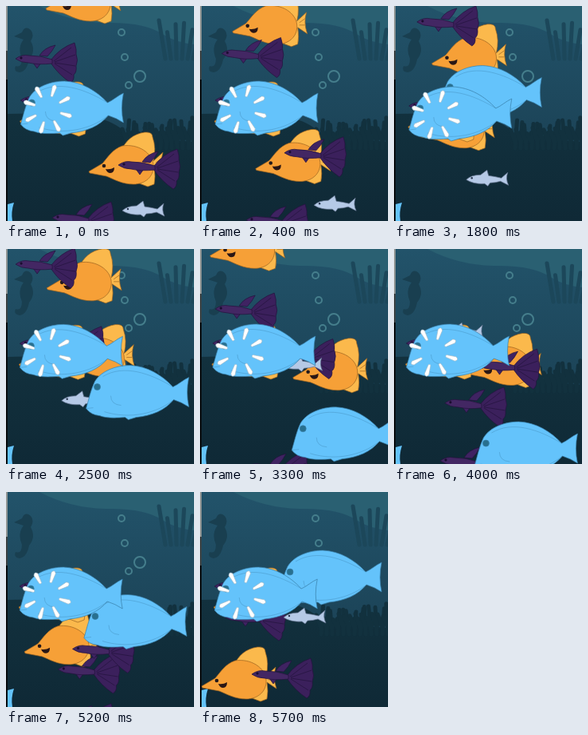
An HTML page that plays this animation: 236x269 px, repeating every 5.8 s.

```html
<!DOCTYPE html>
<html lang="en">
<head>
<meta charset="utf-8">
<title>Reef</title>
<style>
  html, body { margin: 0; width: 100%; height: 100%; overflow: hidden; background: #12303d; }
  svg { display: block; width: 100vw; height: 100vh; }
</style>
</head>
<body>
<svg viewBox="0 0 236 269" preserveAspectRatio="none">
  <defs>
    <linearGradient id="water" x2="0" y2="1">
      <stop offset="0" stop-color="#22536a"/>
      <stop offset=".6" stop-color="#1c4458"/>
    </linearGradient>
    <linearGradient id="floor" x2="0" y2="1">
      <stop offset="0" stop-color="#12313e"/>
      <stop offset="1" stop-color="#0f2936"/>
    </linearGradient>

    <!-- origin: top left of the body -->
    <g id="blue" stroke="#397fa8" stroke-width=".7" stroke-linejoin="round">
      <path fill="#64c3fb" d="M1 54C4 44 7 30 12 20C20 7 38 0 56 0C78 1 96 12 110 27C117 24 123 18 130 15Q126 34 130 52Q121 46 111 43C100 56 84 63 64 65L54 68L50 65C36 66 26 66 18 63Q7 62 1 54Z"/>
      <path fill="none" stroke-opacity=".5" d="M22 14C48 -2 82 10 110 27M24 58C56 68 90 60 111 43M32 38Q32 49 45 50M1 54L10 53"/>
      <circle cx="15" cy="27" r="4" fill="#28708f"/>
    </g>

    <!-- origin: tip of the snout -->
    <g id="orange" stroke="#9b6420" stroke-width=".7" stroke-linejoin="round">
      <path fill="#fbb94c" d="M40 -26C46 -40 56 -48 70 -50Q80 -51 80 -44Q85 -30 81 -14L93 -25Q89 -12 94 2L82 -6Q84 6 82 15L74 18L58 12Z"/>
      <path fill="#f6a037" d="M0 -1L17 -11C24 -19 30 -29 42 -33C62 -36 80 -24 81 -9C82 6 70 15 56 15C42 15 32 9 22 5L1 1Z"/>
      <path fill="none" d="M84 -12L91 -17M84 -9L91 -9"/>
      <circle cx="19" cy="-8" r="2.3" fill="#241a1c" stroke="none"/>
      <path fill="#2a1715" stroke="none" d="M21 -4Q27 -3 32 -6Q32 1 27 1Q23 1 21 -4"/>
    </g>

    <!-- origin: tip of the head -->
    <g id="purple" stroke="#23133d" stroke-width=".7" stroke-linejoin="round">
      <path fill="#3f2362" d="M30 -4Q36 -14 50 -17Q46 -9 40 -3ZM22 5L27 12L32 5"/>
      <path fill="#3b205c" d="M44 2Q56 -14 74 -20Q77 -11 76 -6Q79 2 76 9Q77 17 73 20Q74 27 69 30Q54 20 44 5Z"/>
      <path fill="#432763" d="M0 0Q8 -6 17 -4Q32 -4 46 1V6Q29 8 16 5Q7 5 0 0Z"/>
      <path fill="none" d="M48 3L70 -14M49 4L75 -5M49 5L75 9M49 6L71 20"/>
      <circle cx="7" cy="-1" r="1.3" fill="#150b26"/>
    </g>

    <!-- origin: tip of the head -->
    <g id="white" stroke="#64738f" stroke-width=".7" stroke-linejoin="round">
      <path fill="#b5c9e6" d="M0 1Q6 -5 18 -5L26 -11L28 -4Q36 -3 44 -1L52 -8Q49 0 53 8L43 3Q36 5 30 5L27 9L23 6Q9 7 0 1Z"/>
      <circle cx="7" cy="-1" r="1.2" fill="#26344d" stroke="none"/>
    </g>
  </defs>

  <rect width="236" height="269" fill="url(#water)"/>
  <path fill="#2a6072" d="M42 0Q80 20 125 21Q175 20 198 36Q215 46 236 48V0Z"/>
  <g id="sponge" fill="none" stroke="#1c475a" stroke-width="5" stroke-linecap="round"></g>
  <path fill="#193f50" d="M10 38L20 33Q24 24 31 30Q36 36 31 44Q38 56 29 67Q26 82 17 83Q9 82 12 75Q20 78 20 66Q14 52 22 42Z"/>
  <g id="bubbles" fill="none" stroke="#457e8c" stroke-width="2"></g>
  <path fill="url(#floor)" d="M0 135Q60 133 115 140Q140 146 155 163L236 170V269H0Z"/>
  <g id="coral" fill="none" stroke="#12313e" stroke-width="5" stroke-linecap="round"></g>
  <path fill="#64c3fb" d="M2 248L10 246Q6 258 8 269H2Z"/>
  <g id="shoal"></g>
  <g id="burst" fill="#fff" stroke="#9fb9c8" stroke-width=".6"></g>
  <path fill="#929796" d="M0 0H2V56H0Z"/>
  <path fill="#3b4244" d="M0 56H2V92H0Z"/>
  <path fill="#070b0e" d="M0 92H2V269H0Z"/>
</svg>
<script>
  const LOOP = 5800;
  const END = 5.7;
  const NS = 'http://www.w3.org/2000/svg';
  const byId = id => document.getElementById(id);

  function add(parent, tag, attrs) {
    const node = document.createElementNS(NS, tag);
    for (const key in attrs) node.setAttribute(key, attrs[key]);
    return parent.appendChild(node);
  }

  let seed = 7;
  const random = () => (seed = seed * 16807 % 2147483647) / 2147483647;

  // Smooth curve through points spread evenly over the loop.
  function curve(...points) {
    const last = points.length - 1;
    const slope = (i, k) => {
      const from = Math.max(i - 1, 0), to = Math.min(i + 1, last);
      return (points[to][k] - points[from][k]) / (to - from);
    };
    return t => {
      const s = t / END * last;
      const i = Math.min(Math.floor(s), last - 1);
      const u = s - i, v = 1 - u;
      return [0, 1].map(k =>
        v * v * ((1 + 2 * u) * points[i][k] + u * slope(i, k))
        + u * u * ((1 + 2 * v) * points[i + 1][k] - v * slope(i + 1, k)));
    };
  }

  const wave = (t, period) => Math.cos(2 * Math.PI * t / period);

  // The middle group sways a little and dips once.
  const sway = (x, y) => t => [
    x - 1.5 + 2 * wave(t - 1, 5.8),
    y + 7 * Math.exp(-(((t - 1.8) / 0.4) ** 2))
  ];

  const swimmers = [
    ['orange', curve([50, 4], [29, 76], [56, 58], [8, 3], [-20, -60], [0, -80])],
    ['orange', curve([104, 208], [20, 194], [55, 145], [118, 163], [52, 157], [2, 244])],
    ['orange', sway(18, 145)],
    ['purple', curve([12, 66], [48, 46], [14, 13], [23, 88], [94, 270], [30, 156])],
    ['purple', curve([141, 199], [50, 156], [38, 117], [97, 135], [102, 161], [65, 228])],
    ['purple', t => [58, 280 - 15 * wave(t, 4)]],
    ['purple', sway(19, 118)],
    ['white', curve([146, 255], [132, 234], [68, 199], [100, 138], [26, 86], [105, 156])],
    ['blue', curve([5, -140], [36, 33], [113, 172], [97, 211], [98, 73])],
    ['blue', sway(18, 94)]
  ].map(([kind, path]) => ({ path, node: add(byId('shoal'), 'use', { href: '#' + kind }) }));

  const burst = { path: sway(53, 129), node: byId('burst') };
  for (let angle = -118; angle < 242; angle += 45) {
    add(burst.node, 'path', {
      d: 'M17 -1.5L29 -2.8Q34 0 29 2.8L17 1.5Q15 0 17 -1.5Z',
      transform: `rotate(${angle})`
    });
  }

  for (const [cx, cy, r] of [[145, 33, 4], [149, 64, 4], [168, 88, 7], [154, 99, 4]]) {
    add(byId('bubbles'), 'circle', { cx, cy, r });
  }

  for (let x = 200; x < 240; x += 7) {
    const lean = (x - 216) * 0.5;
    add(byId('sponge'), 'path', { d: `M${x} 66L${x + lean} ${18 + 16 * random()}` });
  }

  for (let x = 152; x < 240; x += 7) {
    const top = 139 + 12 * random();
    const lean = 10 * random() - 5;
    add(byId('coral'), 'path', {
      d: `M${x} 178L${x + lean} ${top}M${x} 170l-6 ${-10 - 8 * random()}M${x} 168l6 -9`
    });
  }

  // Ten poses a second; the opening stalls between doublings.
  function pose(ms) {
    const step = Math.floor(ms / 100);
    return (step < 7 ? 2 ** Math.floor(Math.log2(step)) : step) / 10;
  }

  function draw() {
    const t = pose(performance.now() % LOOP);
    for (const { node, path } of [...swimmers, burst]) {
      const [x, y] = path(t);
      node.setAttribute('transform', `translate(${x.toFixed(2)} ${y.toFixed(2)})`);
    }
    requestAnimationFrame(draw);
  }
  draw();
</script>
</body>
</html>
```
